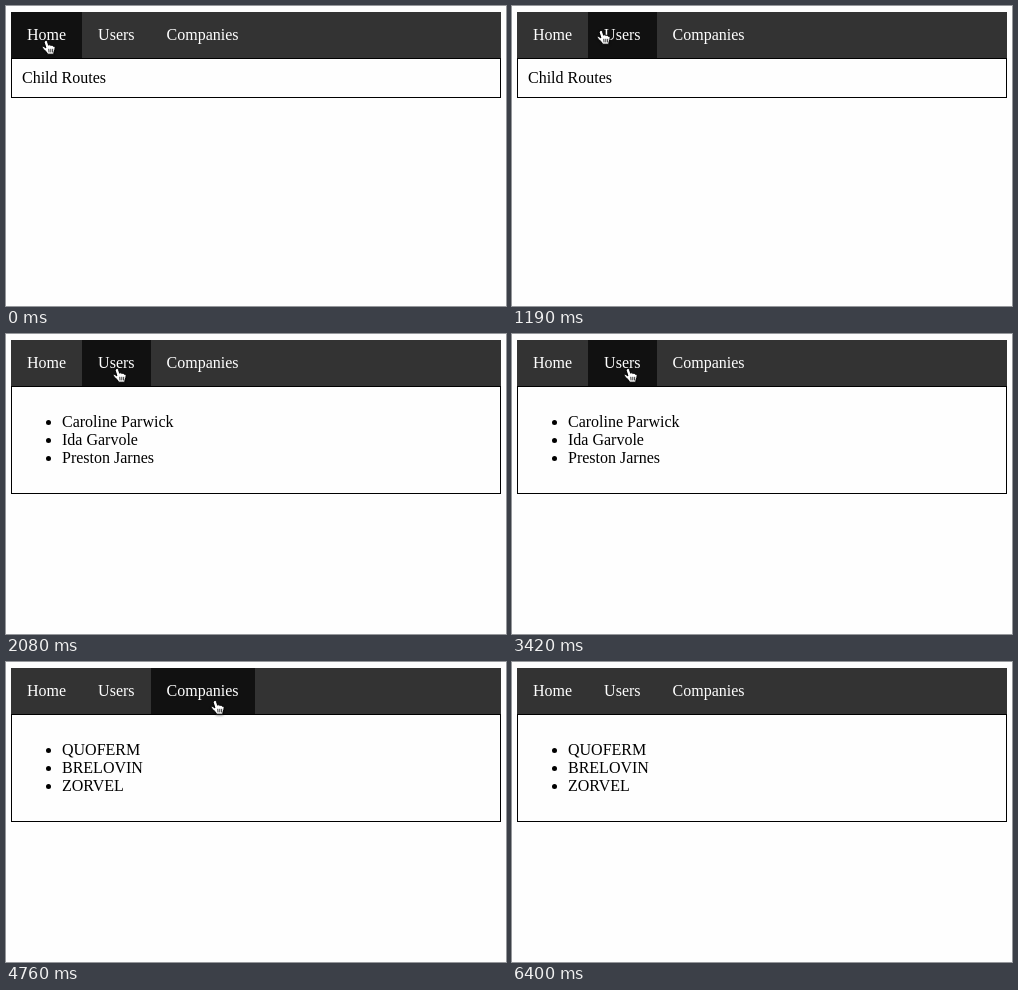
An HTML page for the animation above (6730 ms loop, 500 by 300 pixels).

```html
<!DOCTYPE html>
<html lang="en">
<head>
<meta charset="utf-8">
<title>Child Routes</title>
<style>
  html, body { margin: 0; width: 100%; height: 100%; overflow: hidden; background: #fefefe; }
  body { position: relative; font: 16px/18px "Liberation Serif", "Times New Roman", serif; color: #000; }
  nav { position: absolute; left: 5px; top: 6px; width: 490px; height: 46px; display: flex; background: #333; }
  nav span { padding: 14px 16px; color: #fff; }
  nav .on { background: #111; }
  main { position: absolute; left: 5px; top: 52px; width: 490px; box-sizing: border-box; padding: 10px; border: 1px solid #000; }
  ul { margin: 16px 0; padding: 0 0 0 40px; }
  [hidden] { display: none; }
  svg { position: absolute; left: 0; top: 0; overflow: visible; filter: drop-shadow(0 1px 1px rgba(0, 0, 0, .35)); }
</style>
</head>
<body>
<nav><span>Home</span><span>Users</span><span>Companies</span></nav>
<main>
  <div>Child Routes</div>
  <ul><li>Caroline Parwick</li><li>Ida Garvole</li><li>Preston Jarnes</li></ul>
  <ul><li>QUOFERM</li><li>BRELOVIN</li><li>ZORVEL</li></ul>
</main>
<svg id="hand" width="15" height="16" stroke="#000" stroke-linecap="round" stroke-linejoin="round">
  <path fill="#fff" d="M4 1.9C4.8 1.1 6.1 1.4 6.5 2.6L7.6 6.2C8.1 5.6 9.5 5.6 9.9 6.6C10.7 6 11.9 6.3 12.2 7.3C13.2 6.9 14 7.6 14.1 8.6C14.2 10.5 13.6 11.5 13 13L12.8 15.2H6.5C6 13.4 4.8 12.5 3.4 10.9C2 9.7 1 8.9 1.3 8C2 7 3.4 7.7 4.9 9L3.3 3.6C3.2 3 3.4 2.4 4 1.9Z"/>
  <path fill="none" stroke-width=".8" d="M7.8 10.2l.2 2.8M9.8 10.2v2.8M11.7 10.2l-.1 2.8"/>
</svg>
<svg id="arrow" width="13" height="18">
  <path stroke="#fff" stroke-width=".8" d="M1.5 1V14.2L4.6 11.3L6.6 16L8.7 15.1L6.7 10.5H11Z"/>
</svg>
<script>
  const LOOP = 6730;
  // [start ms, hovered tab, visible view, cursor, x, y]
  const steps = [
    [0, 0, 0, 'hand', 35, 33],
    [1040, 0, 0, 'hand', 44, 32],
    [1190, 1, 0, 'hand', 84, 23],
    [1340, 1, 0, 'hand', 97, 23],
    [1480, 1, 0, 'hand', 106, 31],
    [1630, 1, 0, 'hand', 106, 33],
    [2080, 1, 1, 'hand', 106, 33],
    [3420, 1, 1, 'hand', 111, 33],
    [3570, 2, 1, 'hand', 156, 33],
    [3720, 2, 1, 'hand', 202, 36],
    [3860, 2, 1, 'hand', 204, 37],
    [4760, 2, 2, 'hand', 204, 37],
    [5950, 2, 2, 'hand', 206, 39],
    [6100, -1, 2, 'arrow', 396, 177],
    [6250, -1, 2, 'arrow', 435, 277],
    [6400, -1, 2, '', 0, 0]
  ];
  const tabs = [...document.querySelectorAll('nav span')];
  const views = [...document.querySelector('main').children];
  const cursors = [...document.querySelectorAll('svg')];
  let shown;

  function show([, tab, view, cursor, x, y]) {
    tabs.forEach((el, i) => el.classList.toggle('on', i === tab));
    views.forEach((el, i) => { el.hidden = i !== view; });
    cursors.forEach(el => {
      el.style.display = el.id === cursor ? 'block' : 'none';
      el.style.transform = `translate(${x}px, ${y}px)`;
    });
  }

  const start = performance.now();
  function tick() {
    const t = (performance.now() - start) % LOOP;
    const step = steps.filter(s => s[0] <= t).pop();
    if (step !== shown) show(shown = step);
    requestAnimationFrame(tick);
  }
  tick();
</script>
</body>
</html>
```
